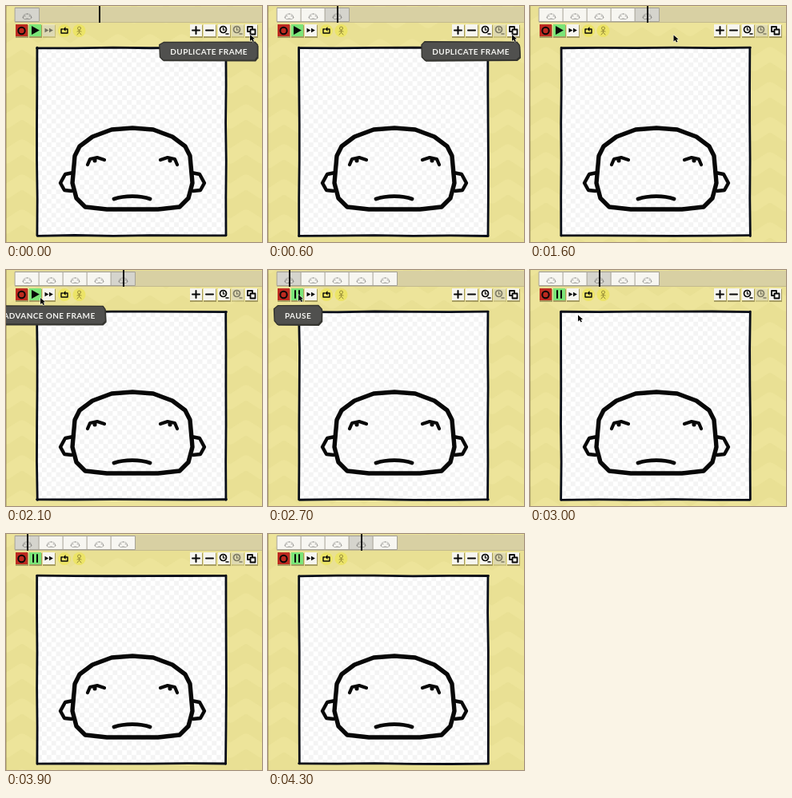
Animation of 320 by 296 pixels, one loop 4400 ms. Source, as an HTML page with a canvas:

```html
<!DOCTYPE html>
<html lang="en">
<head>
<meta charset="utf-8">
<title>Frame editor</title>
<style>
html, body { margin: 0; width: 100%; height: 100%; overflow: hidden; background: #e9e094; }
canvas { display: block; width: 320px; height: 296px; }
</style>
</head>
<body>
<canvas id="stage" width="320" height="296"></canvas>
<script>
const c = document.getElementById('stage').getContext('2d');
const LOOP = 4400, STEP = 100, PLAY_AT = 2600;
const INK = '#080808', KEY = '#f6f5ef', GOLD = '#ece467';
const CX = 158;

// Cursor keys: time, x, y
const PATH = [[0, 305, 36], [1300, 305, 36], [1900, 54, 37], [2100, 43, 35],
  [2300, 38, 31], [2900, 38, 31], [3400, 148, 159], [3900, 176, 190]];

// Tooltips: from, to, label, button centre
const HINTS = [[0, 1400, 'DUPLICATE FRAME', 306], [1900, 2300, 'ADVANCE ONE FRAME', 54],
  [2300, PLAY_AT, 'PLAY', 37.5], [PLAY_AT, 3000, 'PAUSE', 37.5]];

// Left half of the face; the right half is its mirror image
const HEAD = [[158, 153], [132, 155], [108, 164], [92, 176], [86, 188], [83, 222],
  [88, 241], [99, 252], [126, 255], [158, 255]];
const EAR = [[84, 209], [74, 211], [68, 222], [73, 231], [82, 232]];
const LID = [[102, 199], [105, 192], [114, 190], [123, 193]];

const flip = points => points.map(([x, y]) => [2 * CX - x, y]);

function noise(n) {
  const v = Math.sin(n * 127.1 + 31.7) * 43758.5453;
  return v - Math.floor(v);
}

const jitter = (seed, size) => (noise(seed) - .5) * size;

function trace(points, closed) {
  c.beginPath();
  points.forEach(p => c.lineTo(...p));
  if (closed) c.closePath();
}

function stroke(width, points, closed) {
  trace(points, closed);
  c.lineWidth = width;
  c.stroke();
}

function fill(color, points) {
  trace(points, true);
  c.fillStyle = color;
  c.fill();
}

function line(width, x1, y1, x2, y2) {
  stroke(width, [[x1, y1], [x2, y2]]);
}

function box(color, x, y, w, h) {
  c.fillStyle = color;
  c.fillRect(x, y, w, h);
}

function circle(x, y, r) {
  c.beginPath();
  c.arc(x, y, r, 0, Math.PI * 2);
}

function ring(width, x, y, r) {
  circle(x, y, r);
  c.lineWidth = width;
  c.stroke();
}

function at(x, y, paint, scale = 1, alpha = 1) {
  c.save();
  c.translate(x, y);
  c.scale(scale, scale);
  c.globalAlpha = alpha;
  paint();
  c.restore();
}

function background(t) {
  box('#e9e094', 0, 0, 320, 296);
  c.strokeStyle = 'rgba(246,238,172,.25)';
  const shift = t / LOOP * 44;
  for (let y = -44; y < 350; y += 44) {
    const zigzag = Array.from({ length: 19 }, (_, i) => [i * 20 - 20, y + shift + i % 2 * 13]);
    stroke(17, zigzag);
  }
  box('rgba(90,80,40,.3)', 0, 0, 1, 296);
}

function timeline(count, selected, headX) {
  box('#d8d0a3', 11, 1, 309, 19);
  box('#c3ba8e', 11, 20, 309, 1);
  for (let i = 0; i < count; i++) {
    const x = 11 + i * 30;
    box(i === selected ? '#d5d4cd' : '#f7f6f1', x, 2, 30, 17);
    c.strokeStyle = '#a5a296';
    c.lineWidth = 1;
    c.strokeRect(x + .5, 2.5, 30, 17);
    at(x + 15.5 - CX * .065, 0, face, .065, .75);
  }
  box(INK, headX - 1, 0, 2, 21);
}

function key(x, color, glyph, alpha = 1) {
  at(x + 7.5, 30.5, () => {
    box('rgba(80,70,30,.45)', -7.5, -6.5, 16, 16);
    box(color, -7.5, -7.5, 15, 15);
    c.strokeStyle = INK;
    glyph();
  }, 1, alpha);
}

function badge(x, glyph) {
  at(x, 31, () => {
    circle(0, 0, 8);
    c.fillStyle = GOLD;
    c.fill();
    glyph();
  });
}

function triangle(x, size) {
  fill(INK, [[x, -size], [x + size * 1.8, 0], [x, size]]);
}

const record = () => ring(2, 0, .5, 4.2);
const play = () => triangle(-4.5, 5.5);
const pause = () => [-2.5, 2.5].forEach(x => line(2, x, -4.5, x, 4.5));
const skip = () => [-5, .5].forEach(x => triangle(x, 2.7));
const minus = () => line(2, -4.5, 0, 4.5, 0);

function plus() {
  minus();
  line(2, 0, -4.5, 0, 4.5);
}

function clock() {
  ring(1.7, -1, -1, 4);
  line(1.2, -1, -3.5, -1, -.5);
  line(1.2, -1, -.5, 1, -.5);
  line(1.5, 2.5, 4.5, 5.5, 4.5);
}

function copy() {
  c.lineWidth = 1.8;
  for (const p of [-4.5, -1]) {
    box(KEY, p, p, 6, 6);
    c.strokeRect(p, p, 6, 6);
  }
}

function repeat() {
  c.strokeStyle = INK;
  stroke(1.4, [[-2, -2], [-4, -2], [-4, 3], [4, 3], [4, -2], [1, -2]]);
  fill(INK, [[1.5, -5], [1.5, 1], [-1.5, -2]]);
}

function figure() {
  c.strokeStyle = '#968b38';
  ring(1, 0, -3, 2);
  line(1, 0, -1, 0, 2);
  for (const side of [-1, 1]) {
    line(1, 0, 2, side * 2.5, 5);
    line(1, 0, 0, side * 2.5, 1);
  }
}

function toolbar(playing, single) {
  key(12, '#bd2a20', record);
  key(29, '#7be578', playing ? pause : play);
  key(46, KEY, skip, single ? .5 : 1);
  badge(73, repeat);
  badge(91.5, figure);
  [plus, minus, clock, clock, copy].forEach((glyph, i) =>
    key(Math.round(230 + 17.25 * i), KEY, glyph, i === 3 ? .45 : 1));
}

function paper(frame) {
  const cell = 5.9;
  box('#fff', 39, 53, 236, 236);
  for (let y = 0; y < 40; y++) {
    for (let x = y % 2; x < 40; x += 2) box('#f4f4f4', 39 + x * cell, 53 + y * cell, cell, cell);
  }
  c.strokeStyle = '#080d18';
  const corners = [[39, 52.5], [275, 52.5], [275, 288], [39, 288]];
  const seed = Math.floor(frame / 2) * 40;
  corners.forEach(([x, y], side) => {
    const [nx, ny] = corners[(side + 1) % 4];
    const edge = Array.from({ length: 6 }, (_, i) => [
      x + (nx - x) * i / 5 + jitter(seed + side * 6 + i, 1),
      y + (ny - y) * i / 5 + jitter(seed + side * 6 + i + .5, 1)
    ]);
    stroke(2.8, edge);
  });
}

function face() {
  c.strokeStyle = INK;
  stroke(5.4, [...HEAD, ...flip(HEAD).reverse()], true);
  for (const side of [p => p, flip]) {
    stroke(4.4, side(EAR));
    stroke(4.2, side(LID));
    stroke(5, side([[111, 192], [111, 194]]));
  }
  c.beginPath();
  c.moveTo(135, 242);
  c.bezierCurveTo(148, 237.5, 168, 237.5, 180, 242);
  c.lineWidth = 4.8;
  c.stroke();
}

function tooltip(label, centre, frame) {
  c.font = 'bold 10px Lato, "Open Sans", sans-serif';
  c.letterSpacing = '0.4px';
  c.textAlign = 'center';
  const half = c.measureText(label).width / 2 + 13;
  const mid = Math.min(centre, 315 - half);
  const outline = [];
  // Chamfered corners, each point nudged by the seed
  for (let i = 0; i < 4; i++) {
    const sx = i === 1 || i === 2 ? 1 : -1, sy = i < 2 ? -1 : 1;
    const corner = [[half - 4, 11.5], [half, 7.5]];
    if (i % 2 === 0) corner.reverse();
    corner.forEach(([dx, dy], k) => outline.push([
      mid + sx * dx + jitter(frame * 17 + i * 2 + k, 1.5),
      56.5 + sy * dy + jitter(frame * 23 + i * 2 + k, 1)
    ]));
  }
  c.strokeStyle = '#34342f';
  at(1, 1.5, () => fill('#34342f', outline));
  fill('#50504e', outline);
  stroke(1.4, outline, true);
  c.fillStyle = '#f5f5f2';
  c.fillText(label, mid, 60.5);
}

function cursor(t) {
  const i = PATH.findIndex(p => p[0] > t);
  if (i < 1) return;
  const [a, b] = [PATH[i - 1], PATH[i]];
  const u = (t - a[0]) / (b[0] - a[0]);
  at(a[1] + (b[1] - a[1]) * u, a[2] + (b[2] - a[2]) * u, () => {
    const arrow = [[0, 0], [0, 8], [2, 6.2], [3.5, 9], [5, 8.2], [3.6, 5.6], [6, 5.2]];
    c.strokeStyle = 'rgba(255,255,255,.7)';
    stroke(1.2, arrow, true);
    fill(INK, arrow);
  });
}

function draw(t) {
  const frame = Math.floor(t / STEP);
  const playing = t >= PLAY_AT;
  const count = Math.min(5, 1 + Math.floor(t / 270));
  // Eight frames a second, wrapping through five thumbnails
  const selected = playing ? (Math.floor((t - 2700) * .008 + .5) + 5) % 5 : count - 1;
  c.lineCap = c.lineJoin = 'round';
  background(t);
  // The playhead catches up one step after the restart
  timeline(count, selected, 27 + (frame ? selected : 3) * 30);
  toolbar(playing, count === 1);
  paper(frame);
  face();
  const hint = HINTS.find(([from, to]) => t >= from && t < to);
  if (hint) tooltip(hint[2], hint[3], frame);
  cursor(t);
}

const start = performance.now();
function tick() {
  const t = Math.max(0, performance.now() - start) % LOOP;
  draw(Math.floor(t / STEP) * STEP);
  requestAnimationFrame(tick);
}
tick();
</script>
</body>
</html>
```
